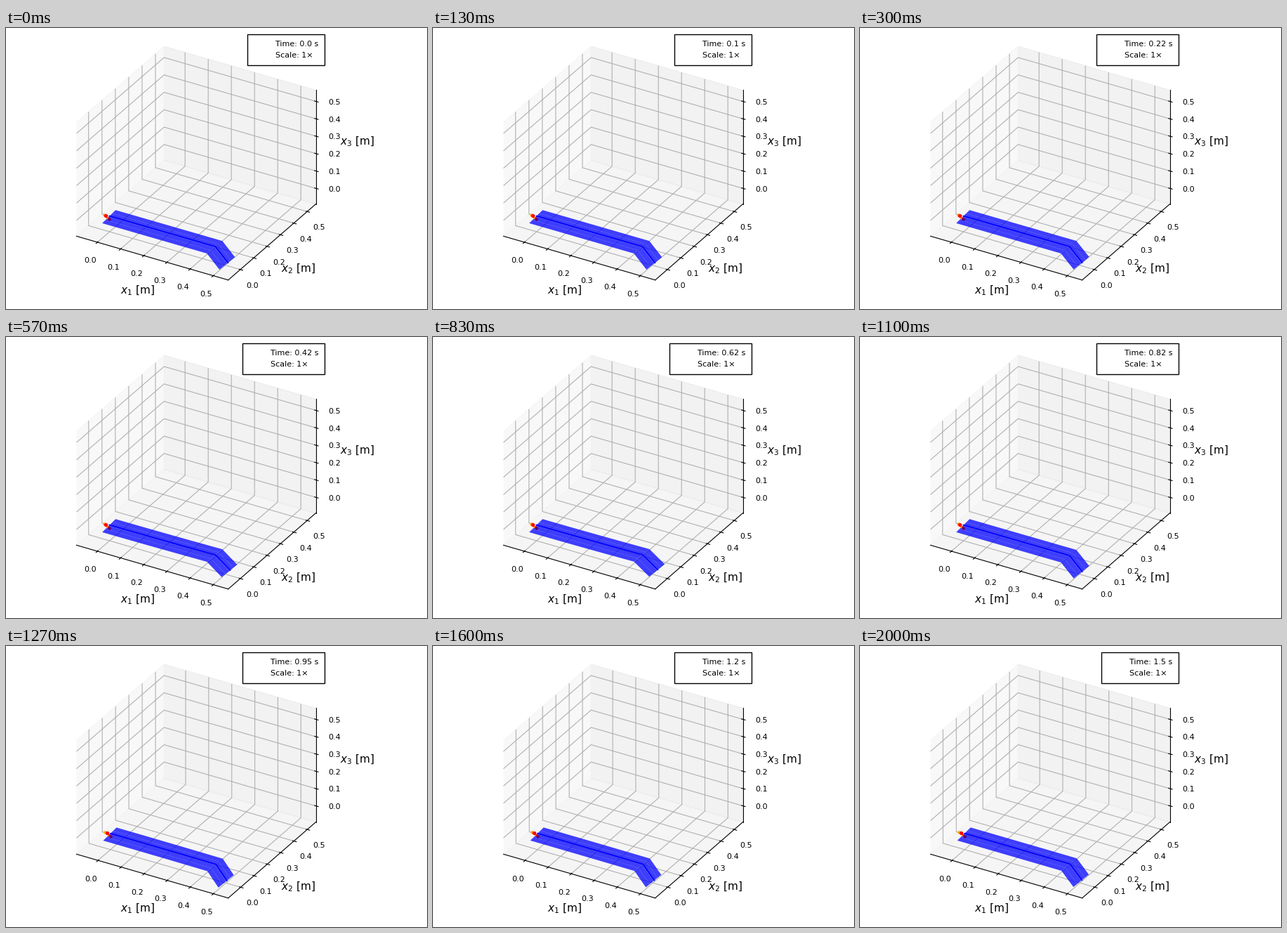
A matplotlib script that plays this animation: 600 by 400 pixels, repeating every 2030 ms.

```python
import numpy as np
import matplotlib.pyplot as plt
from matplotlib.animation import FuncAnimation
from matplotlib.lines import Line2D
from mpl_toolkits.mplot3d.art3d import Poly3DCollection

W, H, DPI = 600, 400, 100
LOOP, TICK = 2030, 10          # ms
STEPS, DT = 61, 0.025          # simulation steps, s
SPAN, TIP = 0.457, 0.09        # wing length, folded tip length
CHORD = np.linspace(-0.055, 0.045, 5)
PITCH = np.tan(np.radians(5))
LOW, HIGH = -0.0905, 0.5645

plt.rcParams.update({"font.family": "DejaVu Sans", "font.size": 10})


def hermite(t, tk, yk):
    """Smooth curve through the knots."""
    tk, yk = np.asarray(tk), np.asarray(yk)
    m = np.gradient(yk, tk)
    i = np.clip(np.searchsorted(tk, t, side="right") - 1, 0, len(tk) - 2)
    h = tk[i + 1] - tk[i]
    s = (t - tk[i]) / h
    return ((1 + 2 * s) * (1 - s) ** 2 * yk[i] + s * (1 - s) ** 2 * h * m[i]
            + s * s * (3 - 2 * s) * yk[i + 1] + s * s * (s - 1) * h * m[i + 1])


times = np.arange(STEPS) * DT
fold = hermite(times,
               [0, 0.1, 0.22, 0.42, 0.57, 0.82, 0.95, 1.05, 1.25, 1.5],
               [53, 53, 52.3, 45, 42, 51.8, 58, 58.6, 56, 54.8])
# The lower limit follows the deepest tip position reached so far.
lows = LOW - 0.0006 * np.maximum(np.maximum.accumulate(fold) - 53, 0)

fig = plt.figure(figsize=(W / DPI, H / DPI), dpi=DPI, facecolor="white")
ax = fig.add_axes([71.75 / W, 8.35 / H, 388 / W, 388 / H], projection="3d",
                  proj_type="ortho", computed_zorder=False)
ax.patch.set_visible(False)
ax.view_init(30, -60)

for k, axis in enumerate((ax.xaxis, ax.yaxis, ax.zaxis), 1):
    axis.set_ticks(np.arange(6) / 10)
    axis.set_rotate_label(False)
    axis.set_label_text(f"$x_{k}$ [m]", fontsize=11, rotation=0)
ax.tick_params(labelsize=8)

skin = Poly3DCollection([np.zeros((4, 3))], facecolors=(0, 0, 1, 0.75),
                        edgecolors="none", zorder=2)
ax.add_collection3d(skin)
axis_line, = ax.plot([0], [0], [0], color="blue", lw=1.2, zorder=3)

for x, z, color, size in [(-0.0233, -0.0017, "orange", 3.2),
                          (-0.0097, -0.0114, "darkorange", 2.4),
                          (-0.0060, -0.0110, "red", 1.8),
                          (-0.0006, -0.0160, (0.4, 0, 0.4), 3.2),
                          (-0.0158, -0.0028, "red", 3.8)]:
    ax.plot([x], [0], [z], "o", color=color, ms=size, mew=0, zorder=4)

blank = [Line2D([], [], ls="none") for _ in range(2)]
legend = ax.legend(blank, ["Time: 0.0 s", "Scale: 1×"], loc="upper right",
                   fontsize=8, borderpad=0.8, fancybox=False,
                   framealpha=1, edgecolor="black")
clock = legend.get_texts()[0]


def wing_line(y, lift):
    """Spanwise line at chord position y, bent upwards by lift."""
    s = np.linspace(0, 1, 16)
    return np.column_stack([s * (SPAN + 0.09 * y), np.full_like(s, y),
                            PITCH * y + lift * s ** 2])


def update(frame):
    i = min(int((frame + 0.5) * TICK * 0.03), STEPS - 1)
    angle = np.radians(fold[i])
    lift = 0.0005 * (53 - fold[i])
    drop = TIP * np.array([np.cos(angle), 0, -np.sin(angle)])

    lines = [wing_line(y, lift) for y in CHORD]
    panels = []
    for p, q in zip(lines, lines[1:]):
        a, b = p[-1], q[-1]
        panels += [np.vstack([p, q[::-1]]),
                   np.array([a, a + drop, b + drop, b])]
    skin.set_verts(panels)
    mid = wing_line(0, lift)
    axis_line.set_data_3d(*np.vstack([mid, mid[-1] + drop]).T)

    for set_lim in (ax.set_xlim, ax.set_ylim, ax.set_zlim):
        set_lim(lows[i], HIGH)
    clock.set_text(f"Time: {times[i] * (1 - 1e-9):.2} s")
    return skin, axis_line, clock


anim = FuncAnimation(fig, update, frames=LOOP // TICK,
                     init_func=lambda: update(0), interval=TICK,
                     repeat=True, repeat_delay=0, blit=False)
plt.show()
```
